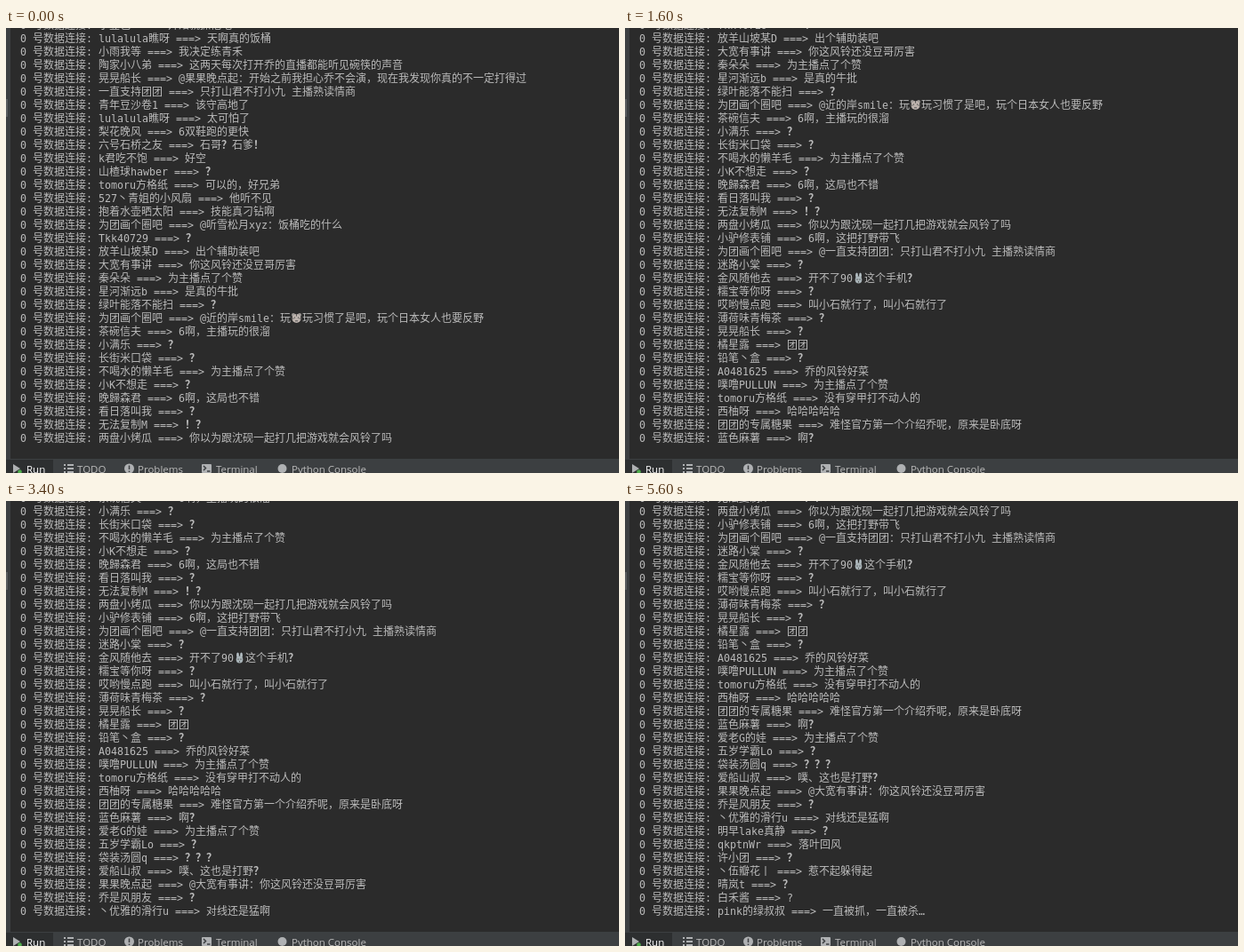
Animation, 689 px wide and 501 px high, one loop 6.4 s. Source, as an HTML page:

```html
<!DOCTYPE html>
<html lang="zh">
<head>
<meta charset="utf-8">
<style>
  html, body { margin: 0; width: 100%; height: 100%; overflow: hidden; background: #2b2b2b; }
  svg { display: block; }
  text { fill: #bbb; }
  .cjk, .mark { font: 12px "Noto Sans CJK SC", "Noto Sans CJK JP", sans-serif; }
  .mark { font-weight: bold; }
  .latin { font: 11.63px "DejaVu Sans Mono", monospace; }
  .tab { font: 11.5px "Open Sans", sans-serif; }
  .icon { fill: #afb1b3; }
  .cut { fill: none; stroke: #3c3f41; stroke-width: 1.5; }
</style>
</head>
<body>
<svg width="689" height="501" viewBox="0 0 689 501">
  <defs>
    <g id="rabbit">
      <ellipse cx="4.5" cy="-7.5" rx="1.4" ry="3" fill="#b4bfc4"/>
      <ellipse cx="8.5" cy="-7.5" rx="1.4" ry="3" fill="#b4bfc4"/>
      <ellipse cx="6.5" cy="-2.5" rx="3.8" ry="4" fill="#a9b4b8"/>
      <path d="M5-3.5v1.3M8-3.5v1.3M6.5-.8v1.2" stroke="#444"/>
    </g>
    <g id="tiger">
      <circle cx="3" cy="-8" r="2" fill="#9d9995"/>
      <circle cx="10" cy="-8" r="2" fill="#9d9995"/>
      <circle cx="6.5" cy="-4" r="5" fill="#bdb3ad"/>
      <path d="M6.5-9v2.5M1.5-4h2M9.5-4h2M4.5-5.5v1.3M8.5-5.5v1.3M5-1.2h3" stroke="#555"/>
    </g>
  </defs>
  <rect width="689" height="501" fill="#2b2b2b"/>
  <svg width="689" height="470"><g id="log"></g></svg>

  <path d="M0 0H5V485H689V501H0Z" fill="#3c3f41"/>
  <rect y="80" width="2" height="20" fill="#5a5d5f"/>
  <rect y="486" width="53" height="15" fill="#2d2f30"/>
  <path class="icon" d="M8 491L16 496L8 501Z"/>
  <circle cx="15.5" cy="499.5" r="2.3" fill="#4fae4c"/>
  <path class="icon" d="M65 491h2v2h-2zM69 491h7v2h-7zM65 495h2v2h-2zM69 495h7v2h-7zM65 499h2v2h-2zM69 499h7v2h-7z"/>
  <circle class="icon" cx="138.5" cy="496" r="5.5"/>
  <path class="cut" d="M138.5 492.500v4.500M138.500 498.500v1.500"/>
  <rect class="icon" x="220" y="491" width="11" height="10" rx="1"/>
  <path class="cut" d="M222 493l2.500 2.500l-2.500 2.500M226 499h3.500"/>
  <circle class="icon" cx="310.5" cy="496" r="5"/>
  <g class="tab">
    <text x="23" y="500.500" style="fill:#fff">Run</text>
    <text x="80" y="500.500">TODO</text>
    <text x="148" y="500.500">Problems</text>
    <text x="236" y="500.500">Terminal</text>
    <text x="321" y="500.500">Python Console</text>
  </g>
</svg>
<script>
const messages = `小豆包|开始就抓他吧
lulalula瞧呀|天啊真的饭桶
小雨我等|我决定练青禾
陶家小八弟|这两天每次打开乔的直播都能听见碗筷的声音
晃晃船长|@果果晚点起：开始之前我担心乔不会演，现在我发现你真的不一定打得过
一直支持团团|只打山君不打小九 主播熟读情商
青年豆沙卷1|该守高地了
lulalula瞧呀|太可怕了
梨花晚风|6双鞋跑的更快
六号石桥之友|石哥？石爹！
k君吃不饱|好空
山楂球hawber|？
tomoru方格纸|可以的，好兄弟
527丶青姐的小风扇|他听不见
抱着水壶晒太阳|技能真刁钻啊
为团画个圈吧|@听雪松月xyz：饭桶吃的什么
Tkk40729|？
放羊山坡某D|出个辅助装吧
大宽有事讲|你这风铃还没豆哥厉害
秦朵朵|为主播点了个赞
星河渐远b|是真的牛批
绿叶能落不能扫|？
为团画个圈吧|@近的岸smile：玩🐯玩习惯了是吧，玩个日本女人也要反野
茶碗信夫|6啊，主播玩的很溜
小满乐|？
长街米口袋|？
不喝水的懒羊毛|为主播点了个赞
小K不想走|？
晚歸森君|6啊，这局也不错
看日落叫我|？
无法复制M|！？
两盘小烤瓜|你以为跟沈砚一起打几把游戏就会风铃了吗
小驴修表铺|6啊，这把打野带飞
为团画个圈吧|@一直支持团团：只打山君不打小九 主播熟读情商
迷路小棠|？
金风随他去|开不了90🐰这个手机？
糯宝等你呀|？
哎哟慢点跑|叫小石就行了，叫小石就行了
薄荷味青梅茶|？
晃晃船长|？
橘星露|团团
铅笔丶盒|？
A0481625|乔的风铃好菜
噗噜PULLUN|为主播点了个赞
tomoru方格纸|没有穿甲打不动人的
西柚呀|哈哈哈哈哈
团团的专属糖果|难怪官方第一个介绍乔呢，原来是卧底呀
蓝色麻薯|啊？
爱老G的娃|为主播点了个赞
五岁学霸Lo|？
袋装汤圆q|？？？
爱船山叔|噗、这也是打野？
果果晚点起|@大宽有事讲：你这风铃还没豆哥厉害
乔是风朋友|？
丶优雅的滑行u|对线还是猛啊
明早lake真静|？
qkptnWr|落叶回风
许小团|？
丶伍瓣花丨|惹不起躲得起
晴岚t|？
白禾酱|?
pink的绿叔叔|一直被抓，一直被杀…`.split('\n');

// [time in ms, index of the newest visible message]
const steps = [[0, 31], [400, 33], [600, 35], [800, 38], [1100, 42], [1400, 45], [1600, 47],
  [2100, 50], [2600, 52], [3400, 54], [3900, 55], [4200, 56], [4800, 58], [5300, 60], [5600, 61]];
const LOOP = 6400, ROW = 15, LAST_BASELINE = 466;
const emoji = { '🐯': 'tiger', '🐰': 'rabbit' };
const log = document.getElementById('log');

// Console cells: 7px for Latin, 12px for CJK, 13px for emoji
function renderLine(line, y) {
  let x = 16, out = '';
  for (const [run] of line.matchAll(/[ -~…]+|[？！]+|[🐯🐰]|[^ -~…？！🐯🐰]+/gu)) {
    if (emoji[run]) {
      out += `<use href="#${emoji[run]}" x="${x}" y="${y}"/>`;
      x += 13;
      continue;
    }
    const latin = /[ -~…]/.test(run);
    const style = latin ? 'latin' : /[？！]/.test(run) ? 'mark' : 'cjk';
    const lead = run.length - run.trimStart().length;
    out += `<text class="${style}" x="${x + lead * 7}" y="${y}">${run.trim()}</text>`;
    x += run.length * (latin ? 7 : 12);
  }
  return out;
}

log.innerHTML = messages.map((message, i) =>
  renderLine('0 号数据连接: ' + message.replace('|', ' ===> '), i * ROW)).join('');

function draw() {
  const time = performance.now() % LOOP;
  const newest = steps.findLast(([start]) => start <= time)[1];
  log.setAttribute('transform', `translate(0 ${LAST_BASELINE - newest * ROW})`);
  requestAnimationFrame(draw);
}
draw();
</script>
</body>
</html>
```
